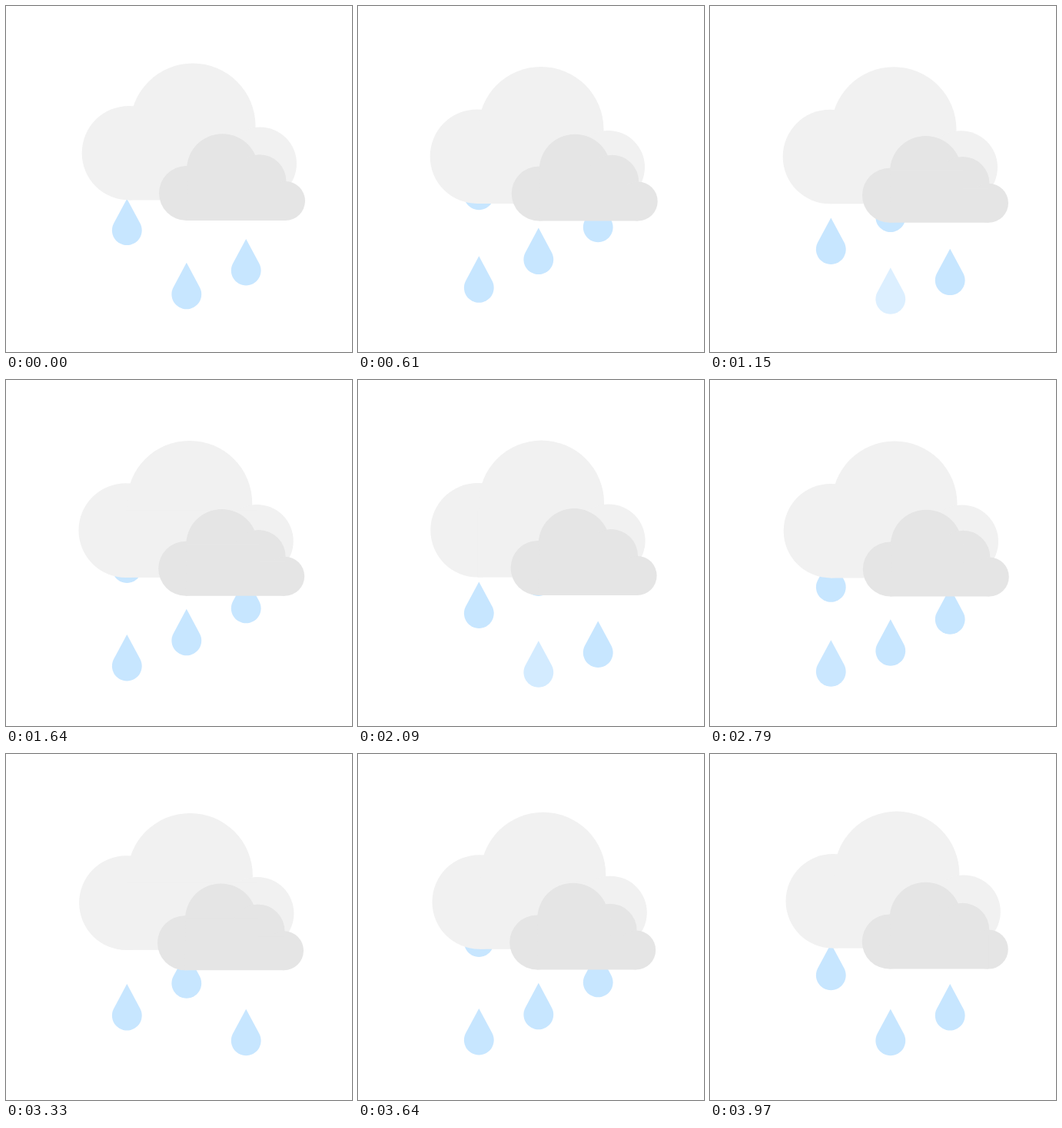
These frames come from a looping animation (450 by 450 pixels, 4000 ms). An HTML page:

```html
<!DOCTYPE html>
<html lang="en">
<head>
<meta charset="utf-8">
<title>Rain clouds</title>
<style>
  html, body { margin: 0; width: 100%; height: 100%; overflow: hidden; background: #fff; }
  svg { display: block; width: 100%; height: 100%; }
</style>
</head>
<body>
<svg viewBox="0 0 450 450">
  <defs>
    <path id="drop" d="M0 -60.5 L17.2 -28.4 A19.4 19.4 0 1 1 -17.2 -28.4 Z"/>
  </defs>
  <g id="rain" fill="#c7e6ff"></g>
  <g id="back" fill="#f1f1f1">
    <circle cx="160" cy="191.2" r="61.3"/>
    <circle cx="243" cy="156" r="81.5"/>
    <circle cx="330.5" cy="205" r="47.5"/>
    <rect x="160" y="165" width="170.5" height="87.5"/>
  </g>
  <g id="front" fill="#e5e5e5">
    <circle cx="234.5" cy="243.5" r="35.5"/>
    <circle cx="281.5" cy="212.7" r="46.5"/>
    <circle cx="329.5" cy="228.2" r="35"/>
    <circle cx="363.5" cy="253.5" r="25.5"/>
    <path d="M236 212 H330 V235 H363.5 V279 H234.5 Z"/>
  </g>
</svg>
<script>
  const LOOP = 4000, FALL = 2000, GAP = 320, LEAD = 800;
  const columns = [157.3, 234.8, 312.2];
  const rain = document.getElementById('rain');
  const back = document.getElementById('back');
  const front = document.getElementById('front');

  const drops = Array.from({ length: 6 }, () => {
    const use = document.createElementNS('http://www.w3.org/2000/svg', 'use');
    use.setAttribute('href', '#drop');
    return rain.appendChild(use);
  });

  // Drift waypoints: [time, dx, dy]
  const backDrift = [
    [0, 0, 0], [610, -5, 4.5], [1150, -4, 4.8], [2090, -4.4, 4.1],
    [2790, -3, 5], [3330, -3.6, 2.4], [4000, 0, 0]
  ];
  const frontDrift = [
    [0, 0, 0], [610, 0.7, 0.5], [1150, -1, 2.7], [2090, -0.4, 0.9],
    [2790, -0.2, 2.5], [3330, -2, 2.2], [4000, -1.2, 0.5]
  ];

  const move = (el, x, y) =>
    el.setAttribute('transform', `translate(${x.toFixed(2)} ${y.toFixed(2)})`);

  // Smooth curve through the waypoints
  function drift(points, t) {
    const last = points.length - 1;
    let i = 0;
    while (i < last - 1 && t >= points[i + 1][0]) i++;
    const a = points[i], b = points[i + 1];
    const span = b[0] - a[0], u = (t - a[0]) / span;
    const slope = (k, c) => {
      const p = points[Math.max(k - 1, 0)], n = points[Math.min(k + 1, last)];
      return (n[c] - p[c]) / (n[0] - p[0]) * span;
    };
    return [1, 2].map(c => {
      const h = u * u * (3 - 2 * u);
      return a[c] + (b[c] - a[c]) * h
        + slope(i, c) * u * (1 - u) ** 2
        - slope(i + 1, c) * u * u * (1 - u);
    });
  }

  // Steady fall, then braking
  function fallY(s) {
    const brake = Math.max(0, s - 370);
    return 311 + 0.131 * s - 0.00009 * brake * brake;
  }

  function fade(s) {
    if (s < -600 || s > 1000) return 0;
    return s < 785 ? 1 : ((1000 - s) / 215) ** 2;
  }

  function draw(t) {
    drops.forEach((drop, i) => {
      const s = (t - GAP * i + LEAD + FALL) % FALL - LEAD;
      move(drop, columns[i % 3], fallY(s));
      drop.setAttribute('opacity', fade(s).toFixed(3));
    });
    move(back, ...drift(backDrift, t));
    move(front, ...drift(frontDrift, t));
  }

  const start = performance.now();
  function tick() {
    draw((performance.now() - start) % LOOP);
    requestAnimationFrame(tick);
  }
  tick();
</script>
</body>
</html>
```
